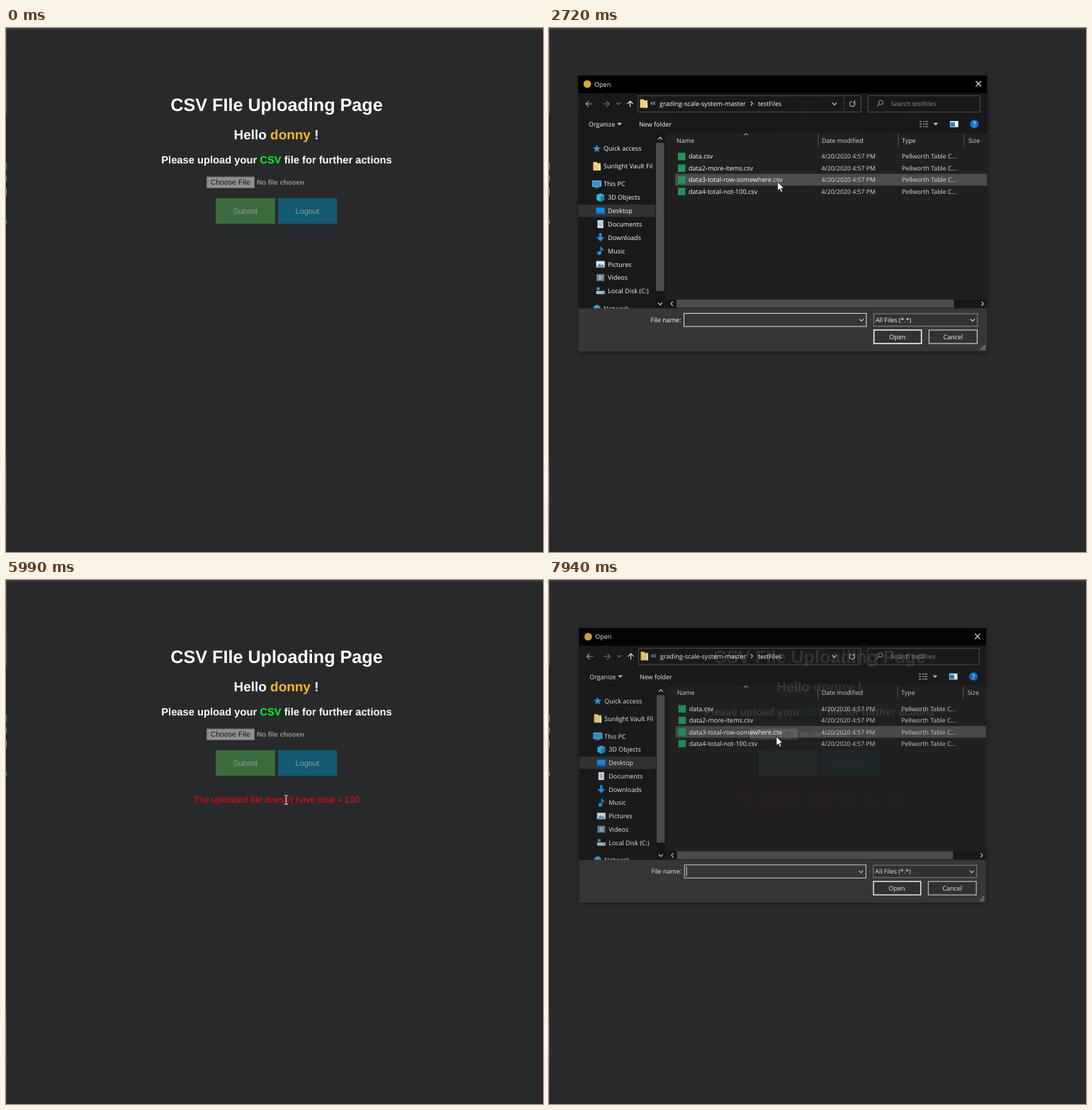
Recreate the animation shown at these times as an HTML page. Size 758 by 739 pixels, loop 8000 ms.

```html
<!DOCTYPE html>
<html lang="en">
<head>
<meta charset="utf-8">
<title>CSV upload</title>
<style>
  html, body { margin: 0; height: 100%; overflow: hidden; background: #28292b; }
  svg { display: block; width: 100vw; height: 100vh; }
  text { text-rendering: geometricPrecision; white-space: pre; }
  #page text { font-family: "Liberation Sans", Arial, sans-serif; }
  #page .b { font-weight: 700; }
  #dialog text { font-family: "Open Sans", "Noto Sans", sans-serif; }
  .mid { text-anchor: middle; }
  .line { fill: none; stroke-width: 1.1; }
</style>
</head>
<body>
<svg id="stage" viewBox="0 0 758 739" preserveAspectRatio="none">
  <defs>
    <linearGradient id="edge" x1="0" y1="0" x2="0" y2="1">
      <stop offset="0" stop-color="#46566c"/>
      <stop offset=".16" stop-color="#5d6878"/>
      <stop offset=".168" stop-color="#1f2022"/>
      <stop offset=".8" stop-color="#222426"/>
      <stop offset=".85" stop-color="#40536a"/>
      <stop offset="1" stop-color="#2f4258"/>
    </linearGradient>
    <clipPath id="navClip"><rect x="41" y="148" width="109.5" height="247.5"/></clipPath>
    <filter id="soft" x="-10%" y="-10%" width="120%" height="120%"><feGaussianBlur stdDeviation="3"/></filter>
  </defs>

  <g id="page">
    <rect width="758" height="739" fill="#28292b"/>
    <rect width="758" height="3" fill="#37383a"/>
    <rect width="1" height="739" fill="url(#edge)"/>
    <path d="M.5 190v10M.5 208v8M.5 226v10M.5 270v6" stroke="#85898d"/>
    <text class="b mid" x="382" y="117" font-size="25.2" fill="#fff">CSV FIle Uploading Page</text>
    <text class="b mid" x="381.5" y="157" font-size="18.96" fill="#fff">Hello <tspan fill="#ffb520">donny</tspan> !</text>
    <text class="b mid" x="382" y="190.5" font-size="14.72" fill="#fff">Please upload your <tspan fill="#00f71c">CSV</tspan> file for further actions</text>
    <g id="picker">
      <rect x="283.5" y="210" width="67" height="15.5" fill="#f5f5f5" stroke="#b5b5b5"/>
      <text x="288.7" y="221.3" font-size="10.5" fill="#000">Choose File</text>
      <text id="chosen" class="b" x="354" y="221.3" font-size="9.8" fill="#fff"></text>
    </g>
    <g id="submit">
      <rect x="296" y="240" width="84" height="36" fill="#4caf50"/>
      <text class="mid" x="338" y="262" font-size="11.06" fill="#fff">Submit</text>
    </g>
    <g opacity=".5">
      <rect x="384" y="240" width="83" height="36" fill="#008cba"/>
      <text class="mid" x="425.5" y="262" font-size="11.06" fill="#fff">Logout</text>
    </g>
    <text id="error" class="mid" x="382" y="314" font-size="12.6" fill="#f80a0a">The uploaded file doesn't have total = 100</text>
  </g>

  <g id="dialog"></g>

  <g id="cursor">
    <path id="arrow" d="M0 0V12.4L2.9 9.7L5 14.4L7 13.5L4.9 8.9H8.8Z" fill="#fff" stroke="#111" stroke-width=".7"/>
    <g id="hand">
      <path d="M-1.3 .8Q0 -.8 1.3 .8V5Q2.5 4 3.7 5.3Q5 4.6 6 6Q7.6 5.5 8 7V11Q8 13 6.4 16.5H-.4Q-2.2 13.5 -4.4 10.2Q-4.6 8.3 -2.6 9L-1.3 10.2Z" fill="#fff" stroke="#111" stroke-width=".8"/>
      <path d="M1.4 5v4M3.7 5.5v3.5M6 6.2v3" stroke="#111" stroke-width=".6"/>
    </g>
    <path id="beam" class="line" d="M-2.5 -6.3Q0 -6.3 0 -5Q0 -6.3 2.5 -6.3M0 -5V5M-2.5 6.3Q0 6.3 0 5Q0 6.3 2.5 6.3" stroke="#ddd"/>
  </g>
</svg>

<script>
const $ = id => document.getElementById(id);

// Markup helpers
const text = (x, y, s, size = 9, fill = '#fff', cls = '') =>
  `<text x="${x}" y="${y}" font-size="${size}" fill="${fill}" class="${cls}">${s}</text>`;
const rect = (x, y, w, h, fill, stroke = 'none', sw = 1) =>
  `<rect x="${x}" y="${y}" width="${w}" height="${h}" fill="${fill}" stroke="${stroke}" stroke-width="${sw}"/>`;
const line = (d, stroke = '#ddd') => `<path class="line" d="${d}" stroke="${stroke}"/>`;
const solid = (d, fill) => `<path d="${d}" fill="${fill}"/>`;
const dot = (x, y, r, fill) => `<circle cx="${x}" cy="${y}" r="${r}" fill="${fill}"/>`;
const chevron = (x, y, dx, dy, stroke) => dx
  ? line(`M${x - dx} ${y - 3}L${x + dx} ${y}L${x - dx} ${y + 3}`, stroke)
  : line(`M${x - 3} ${y - dy}L${x} ${y + dy}L${x + 3} ${y - dy}`, stroke);
const caretDown = (x, y) => solid(`M${x - 3.5} ${y - 1.7}h7l-3.5 3.6z`, '#ccc');
const folder = (x, y) => solid(`M${x} ${y}h5l1 1.5h4.5v10.5h-10.5z`, '#f4d27a') +
  solid(`M${x + 8} ${y + 5}h2.5v7h-2.5z`, '#fbe9b4');

// Sidebar icons, drawn around their centre
const icons = {
  star: solid('M0 -5.5L1.5 -1.6L5.5 -1.4L2.3 1.1L3.4 5L0 2.8L-3.4 5L-2.3 1.1L-5.5 -1.4L-1.5 -1.6Z', '#2f9fe8'),
  folder: folder(-5.2, -6),
  pc: rect(-6, -4.5, 12, 8, '#2b9ad6', '#8ccdf0', .8) + rect(-3, 4.5, 6, 1, '#9ab'),
  cube: solid('M0 -6L5.5 -3.5V3.5L0 6L-5.5 3.5V-3.5Z', '#30b4e0') + solid('M0 -1L5.5 -3.5V3.5L0 6Z', '#1682b8'),
  desk: rect(-6, -4.5, 12, 9, '#0f8ef0') + rect(-6, 3, 12, 1.5, '#0a66b8'),
  doc: rect(-4, -5.5, 8, 11, '#eef2f5') + line('M-2.4 -2.5h5M-2.4 0h5M-2.4 2.5h5', '#5b9bd0'),
  down: solid('M-1.7 -6h3.4v5.5h3.8L0 5.5L-5.5 -.5h3.8z', '#2196f3'),
  note: dot(-1.5, 3, 2.6, '#1e9bf0') + solid('M0 -6h1.3Q1.7 -3.4 4.5 -1.8L4 0Q2.4 -1.6 1.2 -1.7V3H0z', '#1e9bf0'),
  pic: rect(-6, -4.5, 12, 9, '#dceaf2') + solid('M-5 3.5L-1.5 -1L1 1.5L3 -.5L5 3.5z', '#3f93c8'),
  film: rect(-5.5, -5, 11, 10, '#53606d') + rect(-3, -3.8, 6, 7.6, '#8fa7bd') +
    '<path d="M-4.3 -4.5v9M4.3 -4.5v9" stroke="#ddd" stroke-dasharray="1 1"/>',
  disk: rect(-6, 0, 12, 4.5, '#b8bec4') + rect(-5, -5, 4, 4, '#2b9ad6') + rect(2, 2, 3, 1, '#3a8'),
  net: dot(0, 0, 5, '#3f9fd8') + rect(-6, 2, 7, 4, '#9cc')
};

const folders = [
  ['cube', '3D Objects'], ['desk', 'Desktop'], ['doc', 'Documents'], ['down', 'Downloads'],
  ['note', 'Music'], ['pic', 'Pictures'], ['film', 'Videos'], ['disk', 'Local Disk (C:)']
];
const navItems = [
  ['star', 170, 'Quick access', 0], ['folder', 195, 'Sunlight Vault Fil', 0], ['pc', 220, 'This PC', 0],
  ...folders.map(([icon, label], i) => [icon, 239 + i * 18.83, label, 1]),
  ['net', 395.5, 'Network', 0]
];

const files = ['data.csv', 'data2-more-items.csv', 'data3-total-row-somewhere.csv', 'data4-total-not-100.csv'];
const rowMid = i => 181 + i * 16.45;

const frame = () =>
  '<rect x="42" y="69" width="577" height="389" fill="#000" opacity=".35" filter="url(#soft)"/>' +
  rect(41, 67, 577.5, 389, '#202020') + rect(41, 67, 577.5, 25, '#000') +
  rect(41, 92, 577.5, 56, '#191919') + rect(41, 148, 125, 247, '#191919') +
  dot(54, 79, 5.4, '#dfae35') + text(64, 82.5, 'Open') +
  line('M602.5 74.8l7.6 7.6M610.1 74.8l-7.6 7.6', '#fff');

const addressBar = () =>
  line('M61 107H52M56 103L52 107L56 111', '#aaa') + line('M76 107h9M81 103l4 4l-4 4', '#777') +
  chevron(98, 106.5, 0, 1.2, '#888') + line('M114.5 111.5V103M110.5 107l4 -4l4 4', '#fff') +
  rect(125.5, 95.5, 315, 23, '#191919', '#4f4f4f') + rect(416, 96, 1, 22, '#3a3a3a') + folder(128.5, 100.5) +
  line('M146 104l-2 2.2l2 2.2M149.5 104l-2 2.2l2 2.2', '#bbb') +
  text(156, 110, 'grading-scale-system-master', 9.1) + chevron(286, 106.5, 1.3, 0) + text(295, 110, 'testFiles', 8.75) +
  chevron(403, 107, 0, 1.6) + line('M431.2 104.8A3.7 3.7 0 1 1 427.5 103.4M431.5 102v3h-3', '#bbb') +
  rect(450.5, 95.5, 158, 23, '#191919', '#4f4f4f') +
  '<circle class="line" cx="468.5" cy="105" r="3" stroke="#888"/>' + line('M466.3 107.2l-3.3 3.4', '#888') +
  text(482.5, 110, 'Search testFiles', 8.9, '#8a8a8a');

const toolbar = () =>
  text(56, 139, 'Organize', 8.9) + caretDown(99.5, 135.5) + text(127, 139, 'New folder', 9) +
  line('M523 132h3M523 135.5h3M523 139h3M528 132h2M531 132h4M528 135.5h2M531 135.5h4M528 139h2M531 139h4', '#bbb') +
  caretDown(546, 135.5) + rect(566.5, 131.5, 11, 8, '#fff', '#9cc8e8') + rect(567, 133, 6, 6, '#1686c8') +
  dot(600.5, 135.5, 6, '#0a74d8') + text(600.5, 139.2, '?', 10, '#fff', 'mid');

const sidebar = () =>
  '<g clip-path="url(#navClip)">' + rect(41, 249, 109, 17.5, '#333') +
  navItems.map(([icon, y, label, sub]) =>
    `<g transform="translate(${67.5 + sub * 5} ${y})">${icons[icon]}</g>` + text(77 + sub * 6, y + 3.4, label)).join('') +
  '</g>' + rect(151, 148, 11.5, 247, '#171717') + rect(151, 162, 11.5, 209, '#4d4d4d') +
  chevron(157, 155.5, 0, -1.5) + chevron(157, 389, 0, 1.5);

const fileList = () =>
  [380, 493, 586].map(x => rect(x - .5, 149, 1, 19, '#585858')).join('') + chevron(278, 150, 0, -1.2, '#999') +
  [[180, 'Name'], [385, 'Date modified'], [498, 'Type'], [592, 'Size']]
    .map(([x, s]) => text(x, 161.7, s, 8.9, '#ddd')).join('') +
  '<rect id="hoverRow" x="178" width="440.5" height="16.6" fill="#4d4d4d"/>' +
  files.map((name, i) => {
    const y = rowMid(i), base = y + 3.4;
    return rect(182, y - 5, 10.5, 10.5, '#23965a') + text(197, base, name, 9.05) +
      text(384.5, base, '4/20/2020 4:57 PM', 8.75, '#ddd') + text(498, base, 'Pellworth Table C...', 8.8, '#ddd');
  }).join('') +
  rect(166, 383, 452.5, 12, '#171717') + rect(180, 383, 391.5, 11.5, '#4d4d4d') +
  line('M174.7 386l-2.6 3l2.6 3') + chevron(612, 389, 1.3, 0);

const footer = () =>
  rect(41, 395.5, 577.5, 60.5, '#383838') + text(143.5, 415, 'File name:', 9) +
  rect(190.5, 402.5, 257.5, 18.5, '#383838', '#e4e4e4') + chevron(441, 412, 0, 1.6) +
  '<rect id="caret" x="193" y="405" width="1" height="13" fill="#fff"/>' +
  rect(458.5, 403, 146.5, 17.5, '#333', '#8a8a8a') + text(461, 415, 'All Files (*.*)', 8.9) + chevron(598, 412, 0, 1.6) +
  rect(458.7, 426, 67, 19, '#333', '#fff', 1.5) + text(491.8, 439, 'Open', 9, '#fff', 'mid') +
  rect(536.5, 426, 68, 19, '#333', '#d0d0d0', 1.2) + text(570.5, 439, 'Cancel', 9, '#fff', 'mid') +
  solid('M614 447h1.6v1.6h-1.6zM611.5 449.6h1.6v1.6h-1.6zM614 449.6h1.6v1.6h-1.6zM609 452.2h1.6v1.6h-1.6zM611.5 452.2h1.6v1.6h-1.6zM614 452.2h1.6v1.6h-1.6z', '#aaa');

const tooltip = () => '<g id="tip">' + rect(246.5, 237.5, 220.5, 38.5, '#2b2b2b', '#6e6e6e') +
  text(251, 248, 'Type: Pellworth Table Comma Separated Values File', 8.75) +
  text(251, 259.8, 'Size: 142 bytes', 8.75) + text(251, 271.4, 'Date modified: 4/20/2020 4:57 PM', 8.8) + '</g>';

$('dialog').innerHTML = frame() + addressBar() + toolbar() + sidebar() + fileList() + footer() + tooltip();

// Timeline
const LOOP = 8000, OPEN = [2195, 7690], CLOSE = 4050, RELOAD = 5250;
const stops = [
  [0, 722, 790], [100, 681, 727], [450, 520, 470], [900, 398, 309], [1000, 390, 299], [1250, 355, 252],
  [1600, 325, 219], [1900, 323, 217], [2720, 323, 217], [3050, 241, 227], [4120, 241, 227],
  [4400, 285, 238], [4700, 348, 265], [5330, 348, 265], [5750, 395.5, 310], [6020, 395.5, 310],
  [6190, 377, 292], [6550, 355, 262], [6900, 322, 234], [7010, 321, 229], [7080, 321, 225],
  [7220, 321, 225], [7400, 321, 221], [8000, 321, 221]
];

function cursorAt(t) {
  const i = Math.max(1, stops.findIndex(s => s[0] >= t));
  const [t0, x0, y0] = stops[i - 1], [t1, x1, y1] = stops[i];
  const k = Math.min(1, Math.max(0, (t - t0) / (t1 - t0)));
  return [x0 + (x1 - x0) * k, y0 + (y1 - y0) * k];
}
const within = (t, x, y, w, h) => {
  const [cx, cy] = cursorAt(t);
  return cx >= x && cx <= x + w && cy >= y && cy <= y + h;
};
const modal = t => (t >= OPEN[0] && t < CLOSE) || t >= OPEN[1];
const overPicker = t => modal(t) || within(t, 283, 209, 200, 17);
const overSubmit = t => !modal(t) && !(t >= RELOAD && t < 5800) && within(t, 296, 240, 84, 36);

// Averaging the recent hover state gives a linear transition
function glow(over, t, span = 150) {
  let n = 0;
  for (let k = 0; k < 15; k++) n += over(t - k * span / 15);
  return .5 + .5 * n / 15;
}

// 0 = closed, 1 = fully open
function openness(t) {
  if (t >= OPEN[1]) return 1 - Math.exp((OPEN[1] - t) / 95);
  if (t < OPEN[0]) return 0;
  if (t < CLOSE) return 1 - Math.exp((OPEN[0] - t) / 95);
  return Math.max(0, 1 - (t - CLOSE) / 150);
}
const show = (id, on) => $(id).style.display = on ? '' : 'none';

function draw(t) {
  const [x, y] = cursorAt(t);
  $('picker').setAttribute('opacity', glow(overPicker, t));
  $('submit').setAttribute('opacity', t >= RELOAD && t < 5800 ? .5 : glow(overSubmit, t));
  $('chosen').textContent = t >= CLOSE && t < RELOAD ? files[3] : 'No file chosen';
  $('error').setAttribute('opacity', Math.min(1, Math.max(0, (t - RELOAD) / 150)));

  const k = openness(t), s = .93 + .07 * k;
  show('dialog', k > 0);
  $('dialog').setAttribute('opacity', k ** 1.6);
  $('dialog').setAttribute('transform', `translate(330 261.5) scale(${s}) translate(-330 -261.5)`);
  $('hoverRow').setAttribute('y', rowMid(y > 222.3 ? 3 : 2) - 8.3);
  const opened = t >= OPEN[1] ? OPEN[1] : OPEN[0];
  show('caret', Math.floor((t - opened + 95) / 530) % 2 === 0);
  show('tip', t >= 3450 && t < CLOSE);

  const hand = !modal(t) && within(t, 296, 240, 84, 36);
  const beam = t >= RELOAD && !modal(t) && within(t, 266, 302, 232, 15);
  show('hand', hand);
  show('beam', beam);
  show('arrow', !hand && !beam);
  $('cursor').setAttribute('transform', `translate(${x} ${y})`);
}

const start = performance.now();
(function tick() {
  draw((performance.now() - start) % LOOP);
  requestAnimationFrame(tick);
})();
</script>
</body>
</html>
```
